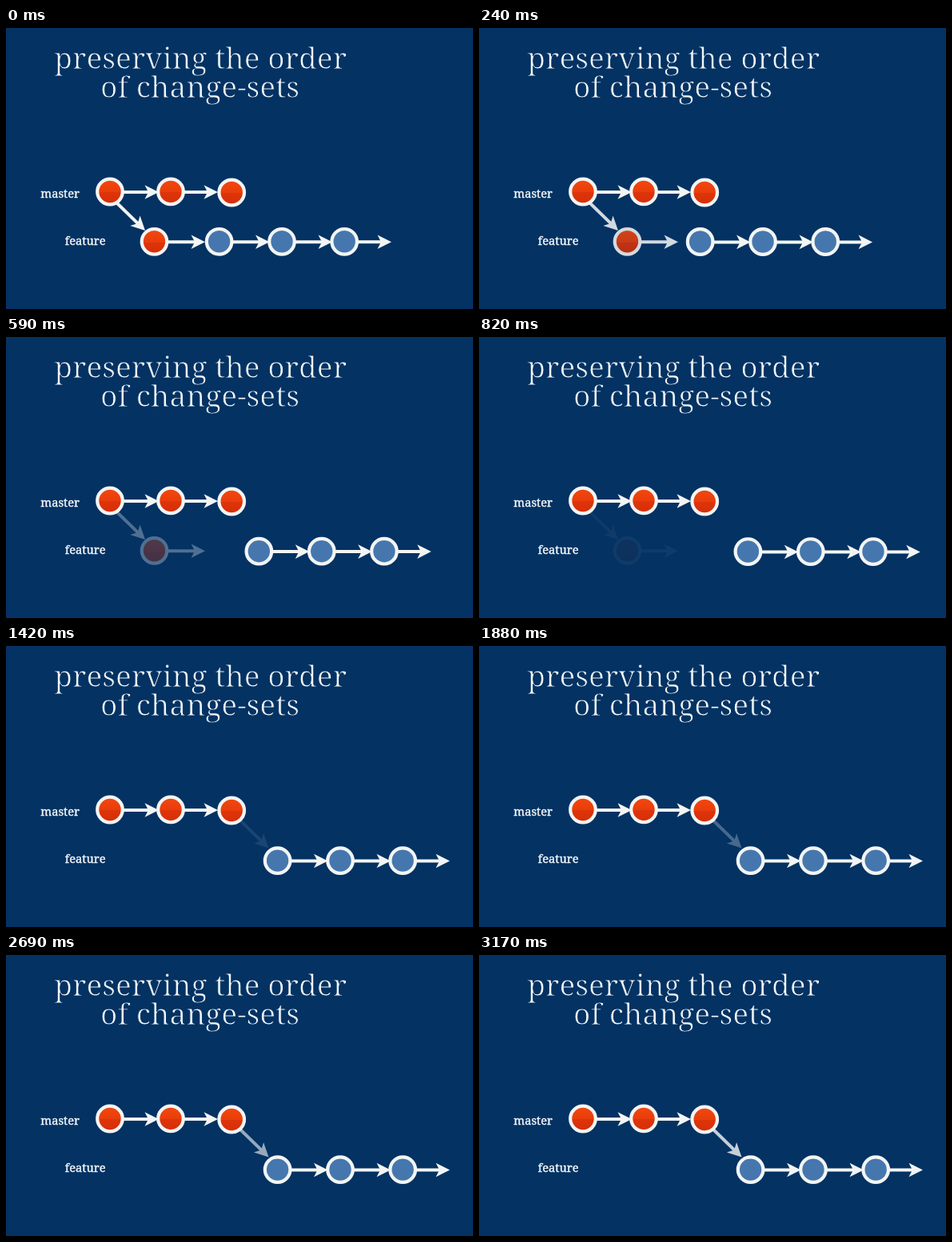
These frames come from a looping animation (584x351 px, 3.41 s). An HTML page:

```html
<!DOCTYPE html>
<html lang="en">
<head>
<meta charset="utf-8">
<title>Preserving the order of change-sets</title>
<style>
  html, body { margin: 0; height: 100%; overflow: hidden; background: #033263; }
  svg { display: block; width: 584px; height: 351px; }
  text { font-family: "Noto Serif", serif; fill: #f4f7f8; }
  /* a stroke in the background colour thins the letters */
  .title { font-size: 37.1px; text-anchor: middle; stroke: #033263; stroke-width: .95; }
  .label { font-size: 14.7px; stroke: #f4f7f8; stroke-width: .4; }
  .node { stroke: #f3f5f4; stroke-width: 4.2; }
  .red { fill: url(#red); }
  .blue { fill: #4577ae; }
  .line { stroke: #f3f5f4; stroke-width: 4; }
  .head { fill: #f3f5f4; }
</style>
</head>
<body>
<svg viewBox="0 0 584 351">
  <defs>
    <linearGradient id="red" x1="0" y1="0" x2="0" y2="1">
      <stop offset="0" stop-color="#f4480f"/>
      <stop offset=".53" stop-color="#e83d0b"/>
      <stop offset=".53" stop-color="#de340a"/>
      <stop offset="1" stop-color="#d52e08"/>
    </linearGradient>
  </defs>
  <text class="title" x="243.2" y="51">preserving the order</text>
  <text class="title" x="242.5" y="87">of change-sets</text>
  <text class="label" x="43.3" y="212.3">master</text>
  <text class="label" x="73.8" y="270.8">feature</text>
  <g id="old"></g>
  <g id="link"></g>
  <g id="master"></g>
  <g id="moved"></g>
</svg>
<script>
const LOOP = 3410;
const STEPS = [0, 120, 240, 350, 470, 590, 700, 820, 940, 1060,
  1420, 1650, 1880, 2110, 2350, 2460, 2690, 2930, 3170];
const [old, link, master, moved] =
  ["old", "link", "master", "moved"].map(id => document.getElementById(id));

function arrow(group, x1, y1, x2, y2) {
  const len = Math.hypot(x2 - x1, y2 - y1);
  const angle = Math.atan2(y2 - y1, x2 - x1) * 180 / Math.PI;
  group.innerHTML += `<g transform="translate(${x1} ${y1}) rotate(${angle})">
    <path class="line" d="M0 0H${len - 12}"/>
    <path class="head" d="M${len} 0l-17.5 -8.8l4.5 8.8l-4.5 8.8z"/></g>`;
}

function node(group, x, y, color) {
  group.innerHTML += `<circle class="node ${color}" cx="${x}" cy="${y}" r="15.8"/>`;
}

arrow(master, 146, 205, 191, 205);
arrow(master, 222, 205, 265, 205);
node(master, 130, 204.5, "red");
node(master, 206, 204.4, "red");
node(master, 282.2, 205.5, "red");

arrow(old, 137.5, 217.5, 174, 253);
arrow(old, 201, 267.2, 249, 267.2);
node(old, 185.5, 266.8, "red");

arrow(link, 292.5, 217.5, 328.5, 252.5);

arrow(moved, 282, 267.2, 329.5, 267.2);
arrow(moved, 360, 267.2, 408, 267.2);
arrow(moved, 438, 267.2, 482, 267.2);
for (const x of [266.6, 345, 423.2]) node(moved, x, 266.8, "blue");

const clamp = v => Math.min(1, Math.max(0, v));
const ease = p => (1 - Math.cos(Math.PI * p)) / 2;

function draw(now) {
  const time = now % LOOP;
  const t = STEPS.findLast(s => s <= time);
  const slide = ease(clamp((t - 15) / 930));
  moved.setAttribute("transform", `translate(${73 * slide} ${1.3 * slide})`);
  old.setAttribute("opacity", 1 - slide);
  link.setAttribute("opacity", clamp((t - 1190) / 2450));
  requestAnimationFrame(() => draw(performance.now() - start));
}

const start = performance.now();
draw(0);
</script>
</body>
</html>
```
